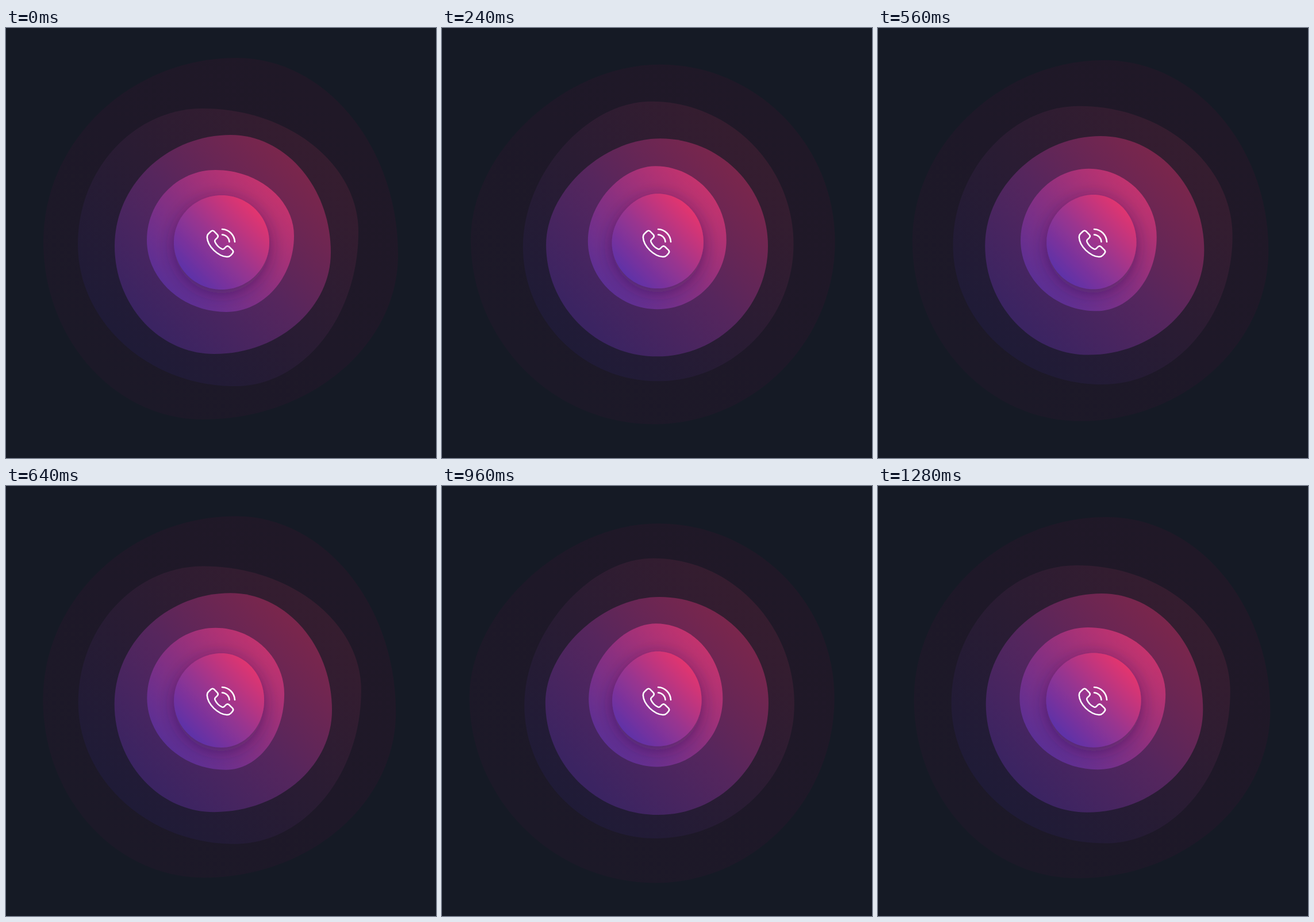
An HTML page for the animation above (1360 ms loop, 748 by 748 pixels).

```html
<!DOCTYPE html>
<html lang="en">
<head>
<meta charset="utf-8">
<title>Calling pulse</title>
<style>
  html, body { margin: 0; width: 100%; height: 100%; overflow: hidden; background: #151a25; }
  svg { display: block; width: 100%; height: 100%; }
  .icon { fill: none; stroke: #fff; stroke-width: 2.6; stroke-linecap: round; stroke-linejoin: round; }
</style>
</head>
<body>
<svg viewBox="0 0 748 748">
  <defs id="defs">
    <filter id="shadow" x="-50%" y="-50%" width="200%" height="200%">
      <feDropShadow dx="0" dy="7" stdDeviation="14" flood-color="#2a1648" flood-opacity=".48"/>
    </filter>
  </defs>
  <g id="rings"></g>
  <g class="icon">
    <path d="M356.5 353.8Q359.3 351.2 362.2 353.8L367.8 359.6Q370 362.3 367.6 364.8L364 368.4Q362.6 370 363.6 372.2Q367.5 380.5 375.6 384.4Q377.8 385.4 379.5 383.8L382.6 380.7Q385.5 378.2 388.2 380.7L394 386.4Q396.4 389 394.2 391.8L390.8 395.6Q388.2 398.2 384 398Q373 397.5 361.5 386.6Q350.4 375.5 349.8 364Q349.6 360.4 352 358Z"/>
    <path d="M376 350A23 23 0 0 1 398 372M376 359.5A13 13 0 0 1 388.5 372"/>
  </g>
</svg>
<script>
const NS = 'http://www.w3.org/2000/svg';
const LOOP = 1360, STEP = 80, MID = 374, ROUND = .55;

// squeeze: flattening twice per loop; lean: tilt at rest; drift: shift of the right side
const rings = [
  { x: 373.5, y: 366.5, rx: 308.5, ry: 314.5, squeeze: 17, lean: 28, drift: -4,
    colors: ['#1c1928', '#1e1828', '#201827'] },
  { x: 369, y: 381.5, rx: 244, ry: 241.5, squeeze: -18, lean: -27, drift: 5,
    colors: ['#1f1b37', '#2a1c33', '#361d2f'] },
  { x: 377, y: 376.5, rx: 188, ry: 190.5, squeeze: 9, lean: 14, drift: 2,
    colors: ['#3b2462', '#56265d', '#7a264c'] },
  { x: 373, y: 370.5, rx: 128, ry: 123.5, squeeze: -10, lean: -9, drift: -17,
    colors: ['#582f96', '#8a3080', '#c4336d'] },
  { x: 375, y: 373, rx: 83, ry: 82, squeeze: -4, lean: 0, drift: -9, shadow: true,
    colors: ['#5c31a9', '#9a358f', '#e2366f'] }
];

function add(parent, tag, attrs) {
  const el = document.createElementNS(NS, tag);
  for (const key in attrs) el.setAttribute(key, attrs[key]);
  return parent.appendChild(el);
}

const defs = document.getElementById('defs');
const layer = document.getElementById('rings');

rings.forEach((ring, i) => {
  const reach = ring.rx * .7;
  const grad = add(defs, 'linearGradient', {
    id: 'g' + i, gradientUnits: 'userSpaceOnUse',
    x1: MID - reach, y1: MID + reach, x2: MID + reach, y2: MID - reach
  });
  ring.colors.forEach((c, k) => add(grad, 'stop', { offset: k / 2, 'stop-color': c }));
  ring.path = add(layer, 'path', { fill: `url(#g${i})` });
  if (ring.shadow) ring.path.setAttribute('filter', 'url(#shadow)');
});

function outline({ x, y, rx, ry, squeeze, lean, drift }, angle) {
  const pulse = Math.sin(angle) ** 2;
  const s = squeeze * pulse, k = lean * (1 - pulse);

  // Sides of the blob, then the point where each side touches its box
  const l = x - rx - 1.1 * s, t = y - ry + .85 * s;
  const r = x + rx + .2 * s + drift * (1 - Math.cos(angle)) / 2, b = y + ry + .6 * s;
  const ly = y + .2 * k, tx = x + k, rightY = y + k, bx = x - 1.1 * k;

  const mix = (from, to, amount = ROUND) => from + (to - from) * amount;
  const flat = ROUND - .06 * pulse;
  return `M${l} ${ly}` +
    `C${l} ${mix(ly, t, flat)} ${mix(tx, l, flat)} ${t} ${tx} ${t}` +
    `C${mix(tx, r)} ${t} ${r} ${mix(rightY, t)} ${r} ${rightY}` +
    `C${r} ${mix(rightY, b)} ${mix(bx, r)} ${b} ${bx} ${b}` +
    `C${mix(bx, l)} ${b} ${l} ${mix(ly, b)} ${l} ${ly}Z`;
}

function draw(now) {
  const time = Math.floor((now % LOOP) / STEP) * STEP;
  const angle = 2 * Math.PI * time / LOOP;
  for (const ring of rings) ring.path.setAttribute('d', outline(ring, angle));
  requestAnimationFrame(draw);
}
draw(performance.now());
</script>
</body>
</html>
```
